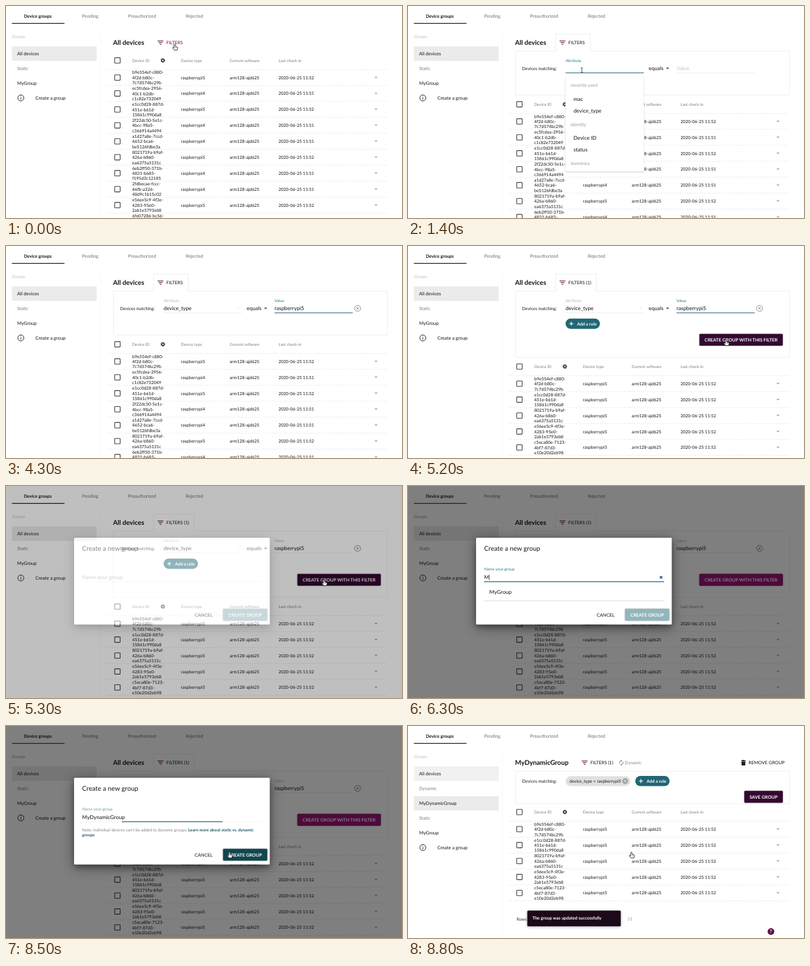
Recreate the animation shown at these times as an HTML page. Size 640 by 344 pixels, loop 9300 ms.

```html
<!DOCTYPE html>
<html lang="en">
<head>
<meta charset="utf-8">
<title>Dynamic device groups</title>
<style>
html, body { margin: 0; width: 100%; height: 100%; overflow: hidden; background: #fff; }
#stage { display: block; width: 100vw; height: 100vh; }
text { font-family: Lato, "Open Sans", sans-serif; text-rendering: geometricPrecision; white-space: pre; }
.paper { filter: drop-shadow(0 4px 4px rgba(0,0,0,.3)) drop-shadow(0 4px 10px rgba(0,0,0,.4)); }
</style>
</head>
<body>
<svg id="stage" viewBox="0 0 640 344"></svg>
<script>
const LOOP = 9300, STEP = 100;
const PLUM = '#340830', WINE = '#5d0f43', TEAL = '#226675', INK = '#151515', GREY = '#7c7c7c', PALE = '#c4c4c4';
const SMALL = 6.47, CELL = 7, BODY = 7.55, FIELD = 8.6, HEAD = 10.6;
const VALUE = 'raspberrypi5', GROUP = 'MyDynamicGroup';

// id, board version; version 5 boards match the filter
const DEVICES = [
  ['b9e554ef-c880-', '4f2d-b80c-', '7c7d574bc29b', 5],
  ['ec5fcdea-2956-', '40c1-b2db-', 'c1c82e732049', 4],
  ['e1cc0d28-887d-', '451e-b61d-', '15861c990da8', 5],
  ['2f22dc50-5e1c-', '4bcc-98a5-', 'c366914a4494', 4],
  ['a1d27a8e-7ccd-', '4652-bca6-', 'be5126fdbe3a', 4],
  ['8021719a-b9af-', '426a-b860-', 'ea6375a5131c', 5],
  ['6eb2ff50-371b-', '4831-b685-', 'f195d3c12185', 4],
  ['2fdbecae-fccc-', '46fb-a326-', '48d9c1b15c02', 4],
  ['e56ee5c9-4f3e-', '4283-95e0-', '2ab1e5793eb8', 5],
  ['6fe07286-bc56-', '4d1a-9c07-', '51b83ce92f60', 4],
  ['c5eca80e-7123-', '4bf7-87d3-', 'e10e20d2eb98', 5]
];

// time, x, y, shape; the pointer moves on to the next entry
const POINTER = [
  [0, 272.5, 62, 'hand'], [900, 272.5, 62, 'hand'], [1100, 281, 104, 'beam'],
  [1400, 281, 104, 'beam'], [1700, 290, 170, 'hand'], [2100, 290, 170, 'hand'],
  [2400, 465, 104, 'beam'], [2700, 465, 104, ''], [4500, 465, 117, 'hand'],
  [4700, 465, 117, 'hand'], [5100, 514, 152, 'hand'], [5400, 514, 152, 'hand'],
  [5500, 498, 162, 'hand'], [5900, 225, 145, 'beam'], [6200, 225, 145, ''],
  [7900, 361, 204.5, 'hand'], [LOOP, 361, 204.5, 'hand']
];

const stage = document.getElementById('stage');
const pen = document.createElement('canvas').getContext('2d');

const ramp = (t, a, b) => Math.max(0, Math.min(1, (t - a) / (b - a)));
const ease = k => 1 - (1 - k) ** 3;
const text = (x, y, s, size = BODY, fill = INK, weight = 400) =>
  `<text x="${x}" y="${y}" font-size="${size}" fill="${fill}" font-weight="${weight}">${s}</text>`;
const rect = (x, y, w, h, fill, more = '') =>
  `<rect x="${x}" y="${y}" width="${w}" height="${h}" fill="${fill}" ${more}/>`;
const path = (d, stroke, w = 1, more = '') =>
  `<path d="${d}" fill="none" stroke="${stroke}" stroke-width="${w}" ${more}/>`;
const shape = (d, fill) => `<path d="${d}" fill="${fill}"/>`;
const circle = (x, y, r, fill, more = '') => `<circle cx="${x}" cy="${y}" r="${r}" fill="${fill}" ${more}/>`;
const fade = (k, s) => k > 0 ? `<g opacity="${k}">${s}</g>` : '';
const arrow = (x, y, fill) => shape(`M${x - 2.6} ${y - 1.3}h5.2l-2.6 2.7z`, fill);
const cross = (x, y, r, col, w) =>
  path(`M${x - r} ${y - r}l${2 * r} ${2 * r}m0 ${-2 * r}l${-2 * r} ${2 * r}`, col, w);
const underline = (x, y, w, k) => {
  const half = w * k / 2, mid = x + w / 2;
  return k > 0 ? path(`M${mid - half} ${y}h${half * 2}`, TEAL, 1.2) : '';
};
function caret(x, y, s) {
  pen.font = `${FIELD}px Lato, "Open Sans", sans-serif`;
  return rect(x + pen.measureText(s).width + .3, y - 7.6, .6, 9.4, '#222');
}

function sidebar(done, dim) {
  const accent = dim ? '#a5167a' : '#5a1048';
  let s = text(29, 18.8, 'Device groups', 7.1, '#111', 700) +
    text(123, 18.8, 'Pending', 7.4, '#707070') + text(197.3, 18.8, 'Preauthorized', 7.4, '#707070') +
    text(290.5, 18.8, 'Rejected', 7.4, '#707070') + rect(9.5, 27.6, 85, 1.4, accent) +
    path('M152.5 42V344', '#f6f6f6', .8) +
    text(9.5, 52, 'Groups', 6.7, dim ? '#8c8c8c' : '#bcbcbc') +
    rect(9.5, 65.5, 137, 23.5, done ? '#f1f1f1' : '#ebebeb') + text(18, 79.7, 'All devices');
  let y = 103.9;
  if (done) {
    s += rect(9.5, 114, 137, 23, '#ebebeb') + text(18, y, 'Dynamic', 7.4, GREY) +
      text(18, y + 24, GROUP);
    y += 48;
  }
  return s + text(18, y, 'Static', 7.4, GREY) + text(18, y + 24, 'MyGroup') +
    circle(24, y + 45.3, 4.9, 'none', 'stroke="#222" stroke-width="1"') +
    rect(23.5, y + 44.6, 1, 3.3, '#222') + rect(23.5, y + 42.5, 1, 1, '#222') +
    text(47.5, y + 48, 'Create a group');
}

const box = y => rect(175.7, y - 4.4, 8.8, 8.8, 'none', 'rx=".8" stroke="#3a3a3a" stroke-width="1.1"');
const divider = y => path(`M163 ${y}H616`, '#dedede', .7, 'stroke-dasharray="2 1.5"');

function table(shift, rows) {
  const y = 88.3 + shift;
  let s = box(y) + ['Device ID', 'Device type', 'Current software', 'Last check-in']
    .map((h, i) => text(204 + i * 78.8, y + 2.3, h, SMALL, GREY)).join('') +
    circle(253.5, y, 2, 'none', 'stroke="#333" stroke-width="1.5"') +
    circle(253.5, y, 3, 'none', 'stroke="#333" stroke-width="1.2" stroke-dasharray="1.3 1.06"') +
    divider(y + 14.9);
  rows.forEach(([a, b, c, v], i) => {
    const m = 116.1 + shift + i * 25.87;
    s += box(m) + [a, b, c].map((p, j) => text(204, m - 5.7 + j * 8.4, p, CELL)).join('') +
      text(282.8, m + 2.5, 'raspberrypi' + v, CELL) + text(361.6, m + 2.5, 'arm128-ajd625', CELL) +
      text(440.4, m + 2.5, '2020-06-25 11:5' + (v - 3), CELL) + arrow(598, m, '#aaa') + divider(m + 12.9);
  });
  return s;
}

function filterHead(x, label, color) {
  return [[0, 9.5], [1.6, 6.3], [3.4, 2.7]].map(([d, w], i) =>
    rect(x + d, 56.2 + i * 2.7, w, 1.1, WINE)).join('') + text(x + 14, 62.4, label, 7.45, color);
}

const addRule = (x, y) => rect(x, y, 55.5, 16.6, TEAL, 'rx="8.3"') +
  path(`M${x + 6} ${y + 8.3}h6.4m-3.2 -3.2v6.4`, '#fff', 1.2) +
  text(x + 18.5, y + 10.9, 'Add a rule', CELL, '#fff', 700);
const button = (x, y, w, label, fill, edge = fill) =>
  rect(x, y, w, 18.6, fill, `rx="1" stroke="${edge}" stroke-width=".6" style="filter:drop-shadow(0 .8px 1px rgba(0,0,0,.3))"`) +
  `<text x="${x + w / 2}" y="${y + 11.9}" text-anchor="middle" font-size="7.3" font-weight="700" fill="#fff">${label}</text>`;

function field(x, label, value, focus, typing) {
  const up = focus > 0 || value;
  return (up ? text(x, 90.7, label, SMALL, focus > 0 ? '#2c7d8d' : '#b8b8b8')
    : text(x, 104.3, label, FIELD, PALE)) +
    path(`M${x} 108.5h126.5`, '#e8e8e8', .7) + underline(x, 108.5, 126.5, focus) +
    text(x, 104.3, value, FIELD, '#111') + (typing ? caret(x, 104.3, value) : '');
}

function panel(t, h, dim) {
  if (h <= 0) return '';
  const picked = t >= 1900, filtered = t >= 4500;
  const n = t < 2900 ? 0 : t < 3700 ? Math.min(9, Math.floor(2 + (t - 2900) * 7 / 600)) :
    Math.min(12, 10 + (t - 3700) / 100);
  const value = VALUE.slice(0, n);
  const attrFocus = picked ? 0 : ease(ramp(t, 900, 1200));
  const valueFocus = t < 5300 ? ease(ramp(t, 2400, 2700)) : 0;
  let s = text(184.5, 104.3, 'Devices matching:', CELL) +
    field(254.7, 'Attribute', picked ? 'device_type' : '', attrFocus, false) +
    text(389, 104.3, 'equals', 8.5, INK) + arrow(419.6, 101.4, '#555') +
    field(434, 'Value', value, valueFocus, t >= 2700 && t < 4200);
  if (picked) s += cross(375.5, 101.2, 1.8, '#e8e8e8', .8) +
    circle(568.2, 101.2, 4.9, 'none', 'stroke="#777" stroke-width=".8"') + cross(568.2, 101.2, 2, '#777', .9);
  if (filtered) s += addRule(254.7, 117.8) +
    button(471.2, 142.9, 134.2, 'CREATE GROUP WITH THIS FILTER', dim ? '#a0127a' : PLUM, PLUM);
  const edge = filtered ? 304.5 : 294.5;
  return path(`M173.5 73.3H238.5V45.5H${edge}V73.3H616.5V${73.3 + h}H173.5Z`, '#ebebeb', .8) +
    `<svg x="173" y="74" width="444" height="${h}" viewBox="173 74 444 ${h}">${s}</svg>`;
}

function menu(k) {
  const items = [['recently used', 128], ['mac', 151, 1], ['device_type', 170, 1], ['identity', 192],
    ['Device ID', 214.2, 1], ['status', 233.2, 1], ['inventory', 255.2]];
  return fade(k, rect(254.5, 115, 126.5, 153.5, '#fff', 'style="filter:drop-shadow(0 1px 1px rgba(0,0,0,.2))"') +
    items.map(([s, y, item]) =>
      item ? text(267.5, y + 2.9, s, FIELD) : text(263, y + 2.6, s, 7.4, '#999')).join(''));
}

function dialog(t) {
  const n = t < 6300 ? 0 : t < 6500 ? 1 : t < 6900 ? 2 + (t - 6500) / 100 :
    Math.min(14, 5 + (t - 6900) / 100);
  const name = GROUP.slice(0, Math.min(n, n < 5 ? 4 : 14));
  const focus = ease(ramp(t, 5900, 6200)) * (1 - ramp(t, 8400, 8600) * .88);
  const open = t >= 8600 ? 0 : focus;
  const ready = n >= 3, hover = t >= 8100;
  let s = rect(110, 84, 316.3, 140.7, '#fff', 'rx="1.5" class="paper"') +
    text(123, 104.8, 'Create a new group', HEAD, INK);
  s += focus || n ? text(123, 137.2, 'Name your group', SMALL, t >= 8400 ? '#739aa3' : '#2c7d8d')
    : text(123, 151.2, 'Name your group', FIELD, '#aaa');
  s += path('M123 155.3h291', '#f1f1f1', .7) + underline(123, 155.3, 291, open) +
    text(123, 151.2, name, FIELD, '#111');
  if (t >= 6000 && t < 7900) s += caret(123, 151.2, name);
  if (n && t < 8400) s += cross(409, 148.2, 2, '#1f4c86', 1.4);
  if (n && !ready) s += path('M123 186.2h291', '#d4d4d4', .9) + text(131.5, 175, 'MyGroup', FIELD);
  if (ready) s += `<text x="123" y="170.7" font-size="6.64" fill="#808080">Note: individual devices can't be added to dynamic groups. ` +
    `<tspan fill="#1d5b69" font-weight="700">Learn more about static vs. dynamic</tspan></text>` +
    text(123, 179.2, 'groups', 6.64, '#1d5b69', 700);
  s += text(305, 211.7, 'CANCEL', 7.45);
  return s + button(351, 199.6, 71, 'CREATE GROUP', hover ? '#12474f' : ready ? TEAL : '#93b5bb');
}

function summary(note) {
  let s = text(173, 63.3, GROUP, HEAD, INK, 700) + filterHead(280.7, 'FILTERS (1)', INK) +
    path('M342.2 61.4a3.2 3.2 0 0 1 2.5-5M347.4 57.6a3.2 3.2 0 0 1-2.5 5', '#777', .9) +
    shape('M344.3 54.7l2 1.7-2 1.7zM345.2 60.9l-2 1.7 2 1.7z', '#777') +
    text(350.3, 62.3, 'Dynamic', 7.1, '#888') +
    shape('M538.5 55.8h2l.6-.8h2l.6.8h2v1.1h-7.2zM539 57.6h6.2v5.4q0 1-1 1h-4.2q-1 0-1-1z', '#222') +
    text(550.3, 62.3, 'REMOVE GROUP', 7.4) +
    rect(173.5, 73.3, 443, 52.7, 'none', 'stroke="#ebebeb" stroke-width=".8"') +
    text(184.5, 91.9, 'Devices matching:', CELL) + rect(254.7, 81.6, 104.5, 15.8, '#e0e0e0', 'rx="7.9"') +
    text(261, 91.9, 'device_type = ' + VALUE, CELL) + circle(351, 89.4, 4.7, '#a3a3a3') +
    cross(351, 89.4, 1.7, '#fff', .9) + addRule(367.3, 81) + button(543.8, 105.6, 61.7, 'SAVE GROUP', PLUM) +
    text(175.5, 315.6, 'Rows', CELL, '#333') + path('M355.3 310.4l2.8 2.8-2.8 2.8M360.7 310.2v6', '#999', .9) +
    circle(586.6, 333.5, 5.4, WINE) + text(584.6, 336.3, '?', 8, '#fff', 700);
  if (note) s += rect(192.8, 299.5, 151, 25.4, '#1c0a1b', 'rx="1.5" style="filter:drop-shadow(0 1px 2px rgba(0,0,0,.35))"') +
    text(201, 314.4, 'The group was updated successfully', CELL, '#fff', 700);
  return s;
}

function pointer(t) {
  let i = POINTER.length - 2;
  while (POINTER[i][0] > t) i--;
  const [t0, x0, y0, kind] = POINTER[i], [t1, x1, y1] = POINTER[i + 1];
  if (!kind) return '';
  const k = ramp(t, t0, t1), e = k * k * (3 - 2 * k);
  const x = x0 + (x1 - x0) * e, y = y0 + (y1 - y0) * e;
  const art = kind === 'hand'
    ? '<path d="M-1.1 .9Q0-.8 1.1 .9V3.8L4.2 4.5Q5.2 4.9 4.9 6.4L4.1 9.6H-.6L-3.3 6.2Q-3.3 4.9-2.2 5.2L-1.1 6.1Z" fill="#fff" stroke="#111" stroke-width=".85" stroke-linejoin="round"/>' +
      path('M1.1 5v2M2.7 5v2', '#555', .5)
    : path('M-1.7-3.7Q0-3.7 0-2.8Q0-3.7 1.7-3.7M0-2.8V2.8M-1.7 3.7Q0 3.7 0 2.8Q0 3.7 1.7 3.7', '#222', .8);
  return `<g transform="translate(${x} ${y})">${art}</g>`;
}

function draw(t) {
  const done = t >= 8700;
  const dim = t >= 8600 ? (done ? 0 : .5) : ramp(t, 5200, 5400);
  const matches = DEVICES.filter(d => d[3] === 5);
  let s = rect(0, 0, 640, 344, '#fff') + sidebar(done, dim > .6);
  if (done) {
    s += table(51.3, matches) + summary(t >= 8800);
  } else {
    const filtered = t >= 4500;
    const h = 71.2 * ease(ramp(t, 0, 600)) + 36.1 * ease(ramp(t, 4400, 4700));
    s += table(h, filtered ? matches : DEVICES.slice(0, 10)) + panel(t, h, dim > .6) +
      text(173, 63.3, 'All devices', HEAD, INK, 700) +
      filterHead(245, filtered ? 'FILTERS (1)' : 'FILTERS', t < 1000 ? WINE : INK) +
      menu(t < 1900 ? ramp(t, 1000, 1200) : 1 - ramp(t, 1800, 2000));
  }
  s += fade(dim, rect(0, 0, 640, 344, 'rgba(0,0,0,.5)') + (dim > 0 ? dialog(t) : ''));
  stage.innerHTML = s + pointer(t);
}

const start = performance.now();
let last = -1;
function tick() {
  const t = Math.floor((performance.now() - start) % LOOP / STEP) * STEP;
  if (t !== last) draw(last = t);
  requestAnimationFrame(tick);
}
tick();
</script>
</body>
</html>
```
